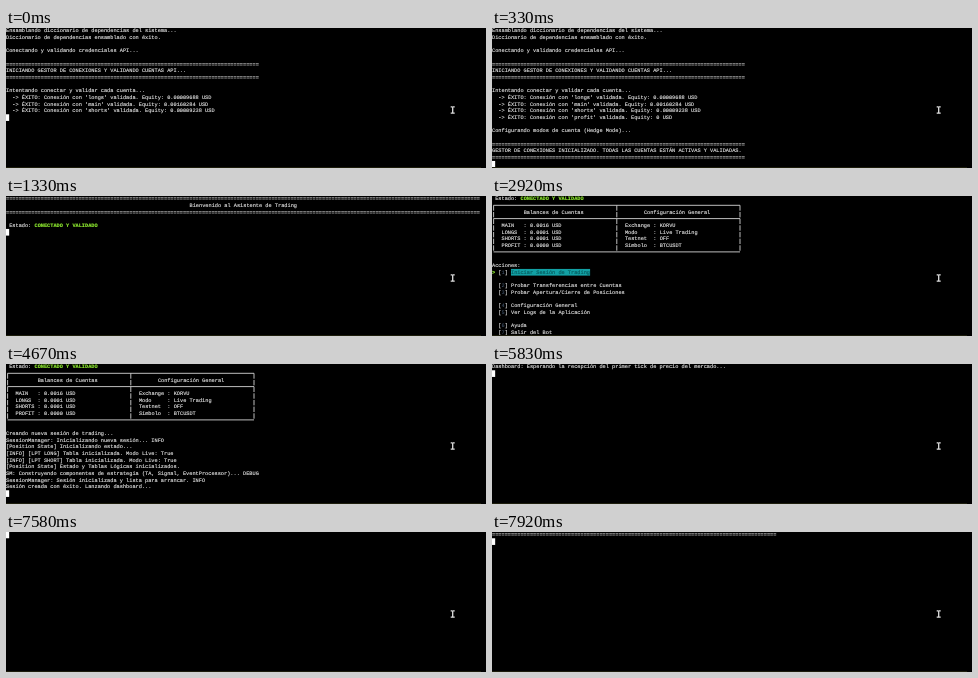
Recreate the animation shown at these times as an HTML page. Size 480 px wide and 140 px high, loop 8000 ms.

```html
<!DOCTYPE html>
<html lang="es">
<head>
<meta charset="utf-8">
<title>Asistente de Trading</title>
<style>
html, body { margin: 0; width: 100%; height: 100%; overflow: hidden; background: #000; }
svg { display: block; width: 480px; height: 140px; }
text {
  font: 5.273px "Liberation Mono", "DejaVu Sans Mono", monospace;
  white-space: pre; text-rendering: geometricPrecision;
  fill: #e2e2e2; stroke: #e2e2e2; stroke-width: .14;
}
.ok { fill: #8fec30; stroke: #8fec30; font-weight: bold; }
.key { fill: #4a5f78; stroke: none; }
.picked { fill: #06585c; stroke: #06585c; }
.bar { fill: #12a0a4; }
.cursor { fill: #fff; }
.frame { fill: none; stroke: #d4d4d4; stroke-width: .9; }
.side { stroke-dasharray: 5.4 1.267; }
.edge { fill: #1d1d0c; }
.beam { fill: none; stroke: #e0e0e0; stroke-width: 1.3; }
</style>
</head>
<body>
<svg viewBox="0 0 480 140">
  <g id="screen"></g>
  <rect class="edge" y="139" width="475" height="1"/>
  <path class="beam" d="M444.7 78.8h1.3l.7 .6 .7-.6h1.3M446.7 79v6M444.7 85.2h1.3l.7-.6 .7 .6h1.3"/>
</svg>
<script>
const CW = 3.1643, RH = 20 / 3, LOOP = 8000;
const screen = document.getElementById('screen');

function add(parent, tag, attrs, text) {
  const el = document.createElementNS('http://www.w3.org/2000/svg', tag);
  for (const k in attrs) el.setAttribute(k, attrs[k]);
  if (text) el.textContent = text;
  parent.appendChild(el);
  return el;
}

const put = (g, row, col, text, cls = '') =>
  add(g, 'text', { x: col * CW, y: row * RH + 4.2, class: cls }, text);

const block = (g, row, col, cols, cls) =>
  add(g, 'rect', { x: col * CW, y: row * RH - .4, width: cols * CW, height: RH, class: cls });

const cursor = (g, row) => block(g, row, 0, 1, 'cursor');

const lines = (g, list, row = 0, col = 0) =>
  list.forEach((s, i) => s && put(g, row + i, col, s));

const rule = n => '='.repeat(n);
const account = (name, equity) =>
  `  -> ÉXITO: Conexión con '${name}' validada. Equity: ${equity} USD`;

const boot = [
  'Ensamblando diccionario de dependencias del sistema...',
  'Diccionario de dependencias ensamblado con éxito.', '',
  'Conectando y validando credenciales API...', '',
  rule(80), 'INICIANDO GESTOR DE CONEXIONES Y VALIDANDO CUENTAS API...', rule(80), '',
  'Intentando conectar y validar cada cuenta...',
  account('longs', '0.00009688'),
  account('main', '0.00160284'),
  account('shorts', '0.00009238'),
  account('profit', '0'), '',
  'Configurando modos de cuenta (Hedge Mode)...', '',
  rule(80),
  'GESTOR DE CONEXIONES INICIALIZADO. TODAS LAS CUENTAS ESTÁN ACTIVAS Y VALIDADAS.',
  rule(80)
];

const log = [
  'Creando nueva sesión de trading...',
  'SessionManager: Inicializando nueva sesión... INFO',
  '[Position State] Inicializando estado...',
  '[INFO] [LPT LONG] Tabla inicializada. Modo Live: True',
  '[INFO] [LPT SHORT] Tabla inicializada. Modo Live: True',
  '[Position State] Estado y Tablas Lógicas inicializados.',
  'SM: Construyendo componentes de estrategia (TA, Signal, EventProcessor)... DEBUG',
  'SessionManager: Sesión inicializada y lista para arrancar. INFO',
  'Sesión creada con éxito. Lanzando dashboard...'
];

const waiting = 'Dashboard: Esperando la recepción del primer tick de precio del mercado...';

// Each menu entry: row, key, label
const menu = [
  [11, '1', 'Iniciar Sesión de Trading'],
  [13, '2', 'Probar Transferencias entre Cuentas'],
  [14, '3', 'Probar Apertura/Cierre de Posiciones'],
  [16, '4', 'Configuración General'],
  [17, '5', 'Ver Logs de la Aplicación'],
  [19, '6', 'Ayuda'],
  [20, '7', 'Salir del Bot']
];

function status(g, row) {
  put(g, row, 1, 'Estado:');
  put(g, row, 9, 'CONECTADO Y VALIDADO', 'ok');
}

function panel(g) {
  status(g, 0);
  add(g, 'path', { class: 'frame', d: 'M1.5 9.3H248M1.5 22.6H248M1.5 55.9H248' });
  add(g, 'path', { class: 'frame side', d: 'M1.6 9.3V55.9M124.8 9.3V55.9M248 9.3V55.9' });
  put(g, 2, 10, 'Balances de Cuentas');
  put(g, 2, 48, 'Configuración General');
  lines(g, ['MAIN   : 0.0016 USD', 'LONGS  : 0.0001 USD',
            'SHORTS : 0.0001 USD', 'PROFIT : 0.0000 USD'], 4, 3);
  lines(g, ['Exchange : KORVU', 'Modo     : Live Trading',
            'Testnet  : OFF', 'Símbolo  : BTCUSDT'], 4, 42);
}

function actions(g) {
  put(g, 10, 0, 'Acciones:');
  block(g, 11, 6, 25, 'bar');
  put(g, 11, 0, '>', 'ok');
  menu.forEach(([row, key, label], i) => {
    put(g, row, 2, '[ ]');
    put(g, row, 3, key, 'key');
    put(g, row, 6, label, i ? '' : 'picked');
  });
}

const scenes = [
  [0, g => { lines(g, boot.slice(0, 13)); cursor(g, 13); }],
  [330, g => { lines(g, boot); cursor(g, 20); }],
  [1330, g => {
    lines(g, [rule(150), '', rule(150)]);
    put(g, 1, 58, 'Bienvenido al Asistente de Trading');
    status(g, 4);
    cursor(g, 5);
  }],
  [2920, g => { panel(g); actions(g); }],
  [3420, g => { panel(g); lines(g, log.slice(0, 2), 10); cursor(g, 12); }],
  [3670, g => { panel(g); lines(g, log, 10); cursor(g, 19); }],
  [5830, g => { put(g, 0, 0, waiting); cursor(g, 1); }],
  [6080, g => {
    lines(g, [waiting, 'Precio recibido. Mostrando dashboard...']);
    cursor(g, 3);
  }],
  [7580, g => cursor(g, 0)],
  [7920, g => { put(g, 0, 0, rule(90)); cursor(g, 1); }]
].map(([start, draw]) => {
  const g = add(screen, 'g', { display: 'none' });
  draw(g);
  return { start, g };
});

let shown;
const origin = performance.now();
function tick() {
  const t = (performance.now() - origin) % LOOP;
  const next = scenes.filter(s => s.start <= t).pop();
  if (next !== shown) {
    if (shown) shown.g.setAttribute('display', 'none');
    next.g.removeAttribute('display');
    shown = next;
  }
  requestAnimationFrame(tick);
}
tick();
</script>
</body>
</html>
```
